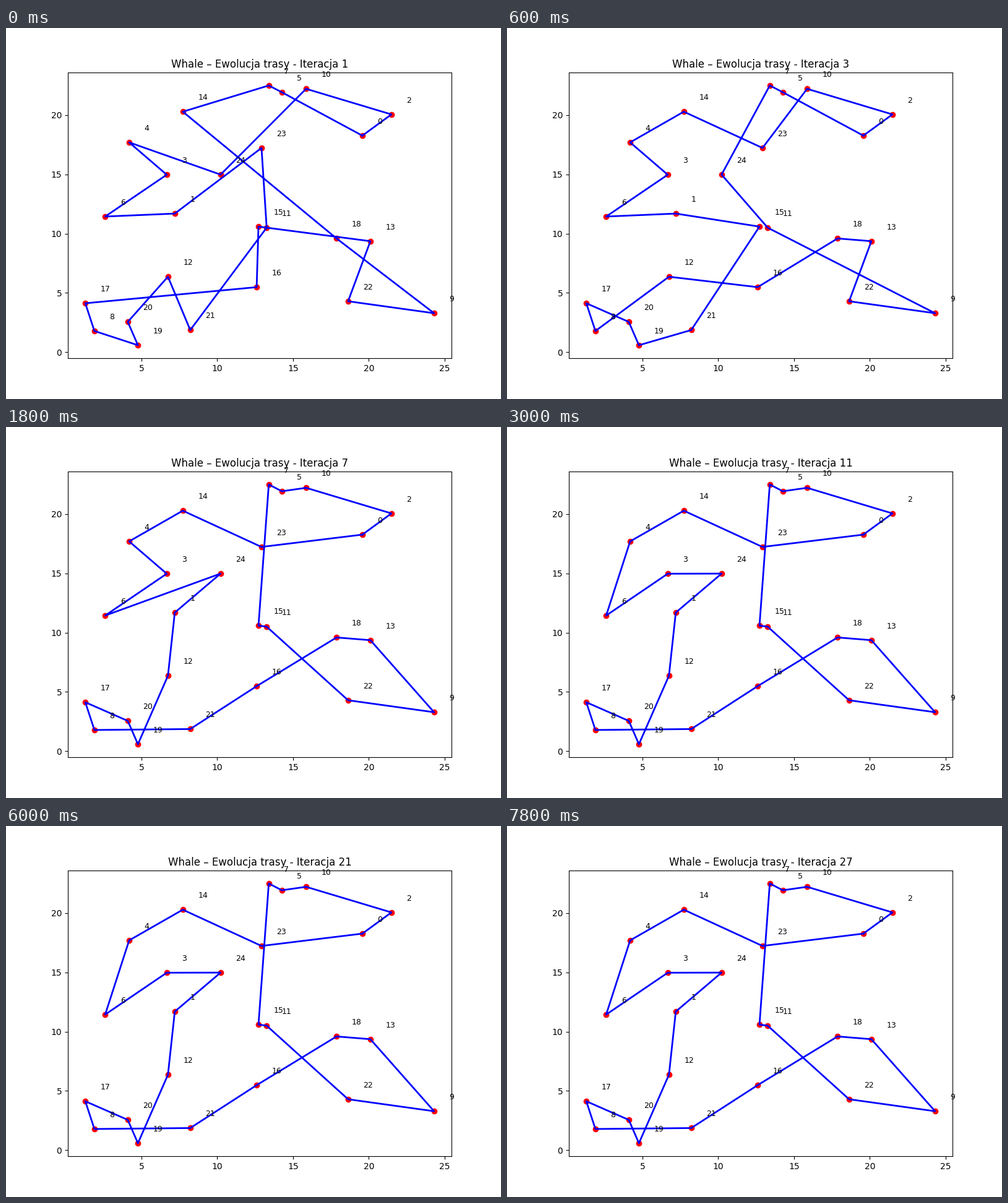
These frames come from a looping animation (800 by 600 pixels, 8000 ms). A matplotlib script:

```python
import matplotlib.pyplot as plt
from matplotlib.animation import FuncAnimation

FRAME_MS = 100
LOOP_MS = 8000
ITERATION_MS = 300

# Cities by number, listed in the order of the first tour
CITIES = {
    0: (19.57, 18.27), 2: (21.49, 20.06), 10: (15.86, 22.22), 24: (10.22, 14.98),
    4: (4.19, 17.70), 3: (6.67, 14.97), 6: (2.61, 11.44), 1: (7.20, 11.69),
    23: (12.92, 17.23), 11: (13.26, 10.50), 21: (8.22, 1.86), 12: (6.75, 6.36),
    20: (4.10, 2.55), 19: (4.77, 0.58), 8: (1.90, 1.78), 17: (1.30, 4.12),
    16: (12.60, 5.48), 15: (12.72, 10.59), 13: (20.10, 9.36), 22: (18.63, 4.29),
    9: (24.30, 3.28), 18: (17.87, 9.59), 14: (7.73, 20.29), 7: (13.40, 22.50),
    5: (14.26, 21.93),
}

# Improvements by iteration: each chain moves its later cities behind its first
CHAINS = {
    3: [(10, 23, 14), (1, 15), (19, 20, 17), (8, 12), (16, 18), (9, 11, 24)],
    5: [(5, 10, 2), (11, 15), (8, 21), (1, 12), (6, 24), (9, 22)],
    9: [(6, 3)],
}


def tour_at(iteration):
    tour = list(CITIES)
    for start, chains in CHAINS.items():
        if iteration < start:
            break
        for anchor, *moved in chains:
            tour = [city for city in tour if city not in moved]
            after = tour.index(anchor) + 1
            tour[after:after] = moved
    return tour


fig, ax = plt.subplots(figsize=(8, 6), dpi=100)
ax.scatter(*zip(*CITIES.values()), color="red")
route, = ax.plot(*zip(*CITIES.values()), color="blue", linewidth=2)
for number, (x, y) in CITIES.items():
    ax.text(x + 1, y + 1, str(number), fontsize=9)
title = ax.set_title("")


def update(frame):
    iteration = 1 + frame * FRAME_MS // ITERATION_MS
    tour = tour_at(iteration)
    route.set_data(*zip(*(CITIES[city] for city in tour + tour[:1])))
    title.set_text(f"Whale – Ewolucja trasy - Iteracja {iteration}")
    return route, title


anim = FuncAnimation(fig, update, frames=LOOP_MS // FRAME_MS,
                     interval=FRAME_MS, repeat=True, repeat_delay=0)
plt.show()
```
